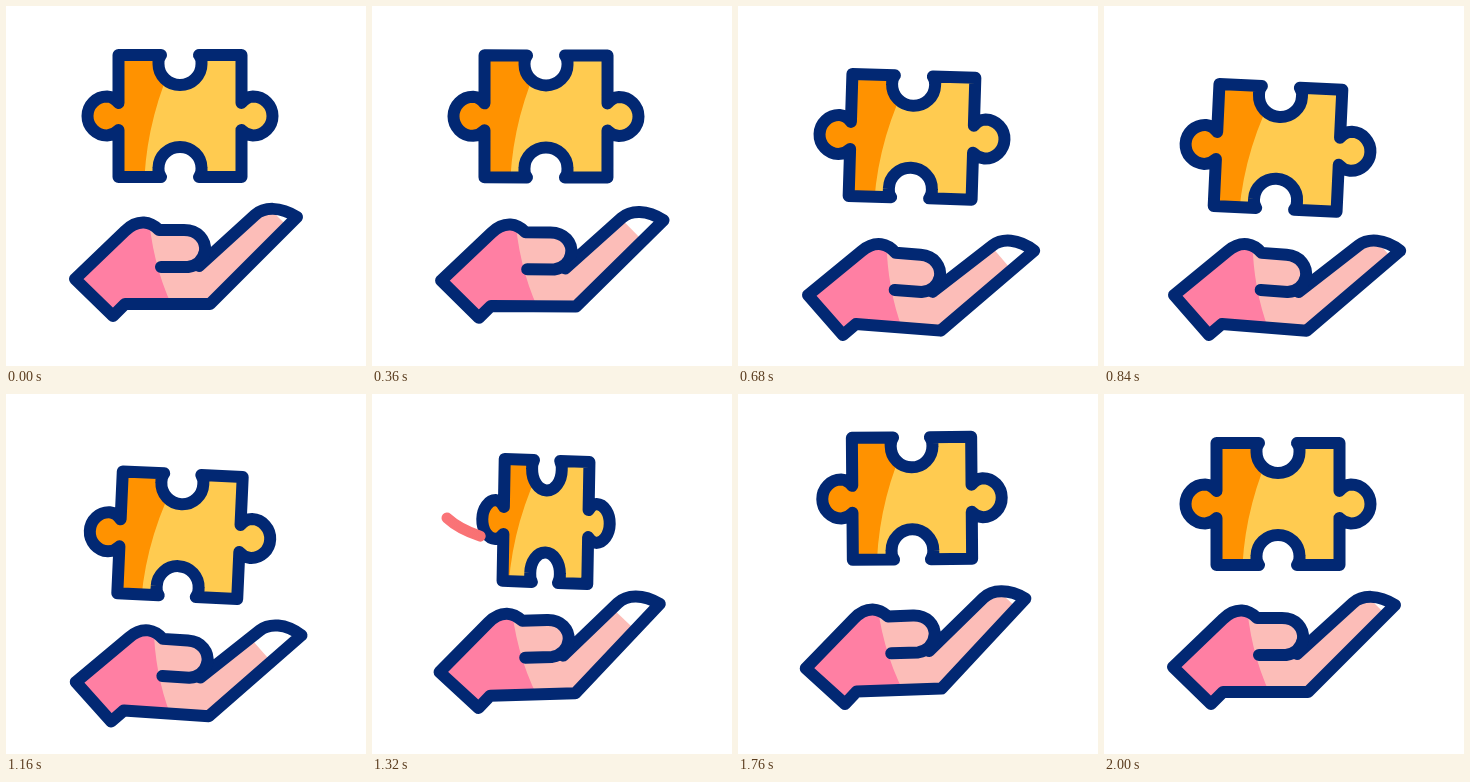
An HTML page that plays this animation: 360x360 px, repeating every 2240 ms.

```html
<!DOCTYPE html>
<html lang="en">
<head>
<meta charset="utf-8">
<title>Hand and puzzle piece</title>
<style>
  html, body { margin: 0; background: #fff; overflow: hidden; }
  svg { display: block; fill: none; stroke-linecap: round; stroke-linejoin: round; }
  .line { stroke: #022873; stroke-width: 12; }
  #jigsaw { vector-effect: non-scaling-stroke; }
</style>
</head>
<body>
<svg width="360" height="360" viewBox="0 0 360 360">
  <defs>
    <path id="palm" d="M107 310L69 273L119 225Q128 216 138 216.5Q146 217 153 224H178C192 224 200 234 199 245Q199 253 193 260L249 209C258 201 274 200 291 211L204 298H119Z"/>
    <path id="jigsaw" d="M112.500 49H155Q152 53 152.500 58A21.500 21 0 0 0 195.500 58Q196 53 193 49H235.500V97Q240 91 247 90.500A19.500 19.500 0 0 1 247 129.500Q240 129 235.500 124V171H193Q196 167 195.500 162A21.500 21 0 0 0 152.500 162Q152 167 155 171H112.500V124Q108 129 101 129.500A19.500 19.500 0 0 1 101 90.500Q108 91 112.500 97Z"/>
    <clipPath id="inPalm"><use href="#palm"/></clipPath>
    <clipPath id="inJigsaw"><use href="#jigsaw"/></clipPath>
    <linearGradient id="glow" gradientUnits="userSpaceOnUse" x1="75" y1="0" x2="276" y2="0">
      <stop stop-color="#fa7478"/><stop offset="1" stop-color="#ef6256"/>
    </linearGradient>
  </defs>
  <g id="hand">
    <use href="#palm" fill="#fcbdb8"/>
    <path clip-path="url(#inPalm)" fill="#ff7fa3" d="M50 200H142Q145 255 166 300V320H50Z"/>
    <path id="shine" stroke="#fff" stroke-width="46" stroke-linecap="butt"/>
    <use href="#palm" class="line"/>
    <path class="line" d="M155 261H182Q196 259 199 245"/>
  </g>
  <use href="#jigsaw" fill="#ffcb50"/>
  <g clip-path="url(#inJigsaw)">
    <path id="shade" fill="#ff9200" d="M60 30H180Q139 105 138 185H60Z"/>
  </g>
  <use href="#jigsaw" class="line"/>
  <path id="streak" pathLength="1" stroke="url(#glow)" stroke-width="11" d="M75 124C115 161 233 161 276 126"/>
</svg>
<script>
const LOOP = 2240, STEP = 40;
const [hand, shine, jigsaw, shade, streak] =
  ["hand", "shine", "jigsaw", "shade", "streak"].map(id => document.getElementById(id));

const ease = u => u * u * u * (10 - 15 * u + 6 * u * u);

// Eased value at time t through [time, value] keys.
function track(t, ...keys) {
  if (t <= keys[0][0]) return keys[0][1];
  for (let i = 1; i < keys.length; i++) {
    const [t0, a] = keys[i - 1], [t1, b] = keys[i];
    if (t < t1) return a + (b - a) * ease((t - t0) / (t1 - t0));
  }
  return keys.at(-1)[1];
}

function drawHand(t) {
  const drop = track(t, [250, 0], [700, 1], [1080, 1], [1440, 0]);
  const turn = track(t, [250, 0], [700, 4.5], [1080, 4.5], [1440, -3.2], [1580, -3.2], [2000, 0]);
  hand.setAttribute("transform",
    `translate(${-2 * drop} ${19 * drop}) rotate(${turn} 107 310)`);
  const gap = track(t, [250, 7], [480, 42], [560, 42], [800, 5], [1000, 5],
    [1200, 36], [1560, 6], [2000, 7]);
  shine.setAttribute("d", `M${279 - gap * 0.7} ${208 + gap * 0.7}L300 187`);
}

// The piece turns by narrowing its outline; the shade keeps its width.
function drawPiece(t) {
  const drop = track(t, [280, 0], [1000, 34.5], [1700, -6], [2000, 0]);
  const spin = track(t, [930, 0], [2000, Math.PI]);
  const width = Math.max(0.03, Math.abs(Math.cos(spin)));
  const pose = scale =>
    `translate(174 ${110 + drop}) scale(${scale} 1) rotate(${drop * 0.085}) translate(-174 -110)`;
  jigsaw.setAttribute("transform", pose(width));
  shade.setAttribute("transform", pose(1));
}

function drawStreak(t) {
  const head = track(t, [1220, 0], [1540, 1]);
  const tail = track(t, [1320, 0], [1660, 1]);
  const shown = head - tail > 0.005;
  streak.setAttribute("visibility", shown ? "visible" : "hidden");
  streak.setAttribute("stroke-dasharray", `${Math.max(0, head - tail)} 2`);
  streak.setAttribute("stroke-dashoffset", -tail);
}

const start = performance.now();
function frame() {
  const t = Math.floor((performance.now() - start) % LOOP / STEP) * STEP;
  drawHand(t);
  drawPiece(t);
  drawStreak(t);
  requestAnimationFrame(frame);
}
frame();
</script>
</body>
</html>
```
